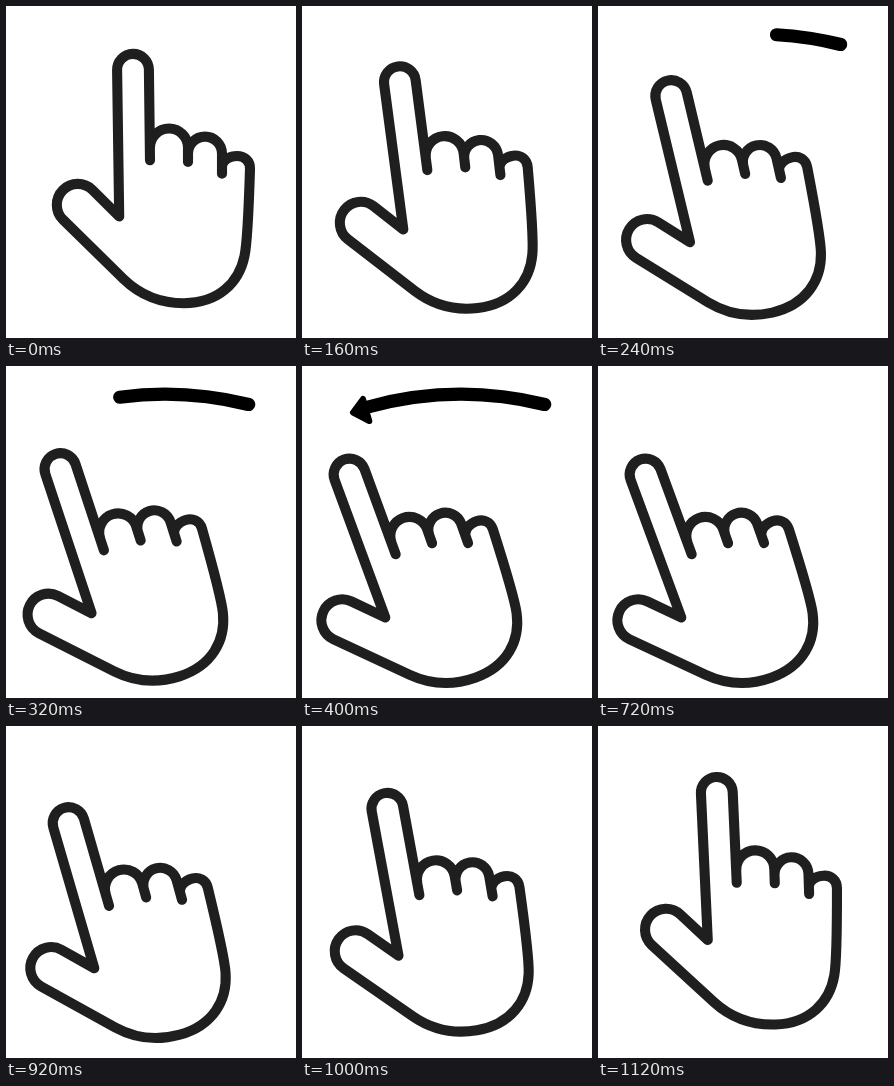
These frames come from a looping animation (290 by 332 pixels, 1160 ms). An HTML page:

```html
<!DOCTYPE html>
<html lang="en">
<head>
<meta charset="utf-8">
<title>Swipe left</title>
<style>
  html, body { margin: 0; width: 100%; height: 100%; overflow: hidden; background: #fff; }
  svg { display: block; width: 290px; height: 332px; }
  path { stroke-linecap: round; stroke-linejoin: round; }
  #hand { fill: none; stroke: #1f1f1f; stroke-width: 10.1; }
  #shaft { fill: none; stroke: #000; stroke-width: 13.2; }
  #head { fill: #000; stroke: #000; stroke-width: 6; }
</style>
</head>
<body>
<svg viewBox="0 0 290 332">
  <path id="shaft" pathLength="1" d="M242.7 38.5 Q154 16.7 66 41"/>
  <path id="head" d="M51 46.5 L61 33 L67.3 55 Z"/>
  <path id="hand" d="
    M144 154.3 L142.9 63.5 A15.9 15.9 0 0 0 111.1 64 L113.2 210.5 L86.5 184
    A20.7 20.7 0 0 0 57 213.7 L117.5 273
    C134 289 155 297.2 178 297.2
    C212 297.2 233 277 238.5 250
    C241.5 236 242.5 212 244 163
    C244.3 155 238.5 150 231 150 C224 150 217.5 153.5 216 159.5
    M144 141.5 A19 19 0 0 1 182 141.5 V156
    M182 147.6 A17 17 0 0 1 216 147.6 V167.8"/>
</svg>
<script>
  const LOOP = 1160, STEP = 40, SWING = 19.4;
  const [hand, shaft, head] = ['hand', 'shaft', 'head'].map(id => document.getElementById(id));

  const span = (t, from, to) => Math.min(1, Math.max(0, (t - from) / (to - from)));
  const sine = p => (1 - Math.cos(Math.PI * p)) / 2;

  function draw(t) {
    // the return swing is cut short by the loop
    const tilt = SWING * (sine(span(t, 0, 400)) - sine(span(t, 800, 1200)));
    hand.setAttribute('transform', `rotate(${-tilt} 218.2 318.5)`);

    const front = span(t, 160, 380), tail = span(t, 400, 640);
    const length = front - tail;
    shaft.style.display = length > 0 ? '' : 'none';
    shaft.style.strokeDasharray = `${length} 2`;
    shaft.style.strokeDashoffset = -tail;

    const size = t < 400 ? 0 : 1 - span(t, 640, 720);
    head.style.display = size > 0 ? '' : 'none';
    head.setAttribute('transform', `translate(51 46.5) scale(${size}) translate(-51 -46.5)`);
  }

  const start = performance.now();
  function tick() {
    const t = (performance.now() - start) % LOOP;
    draw(Math.floor(t / STEP) * STEP);
    requestAnimationFrame(tick);
  }
  tick();
</script>
</body>
</html>
```
